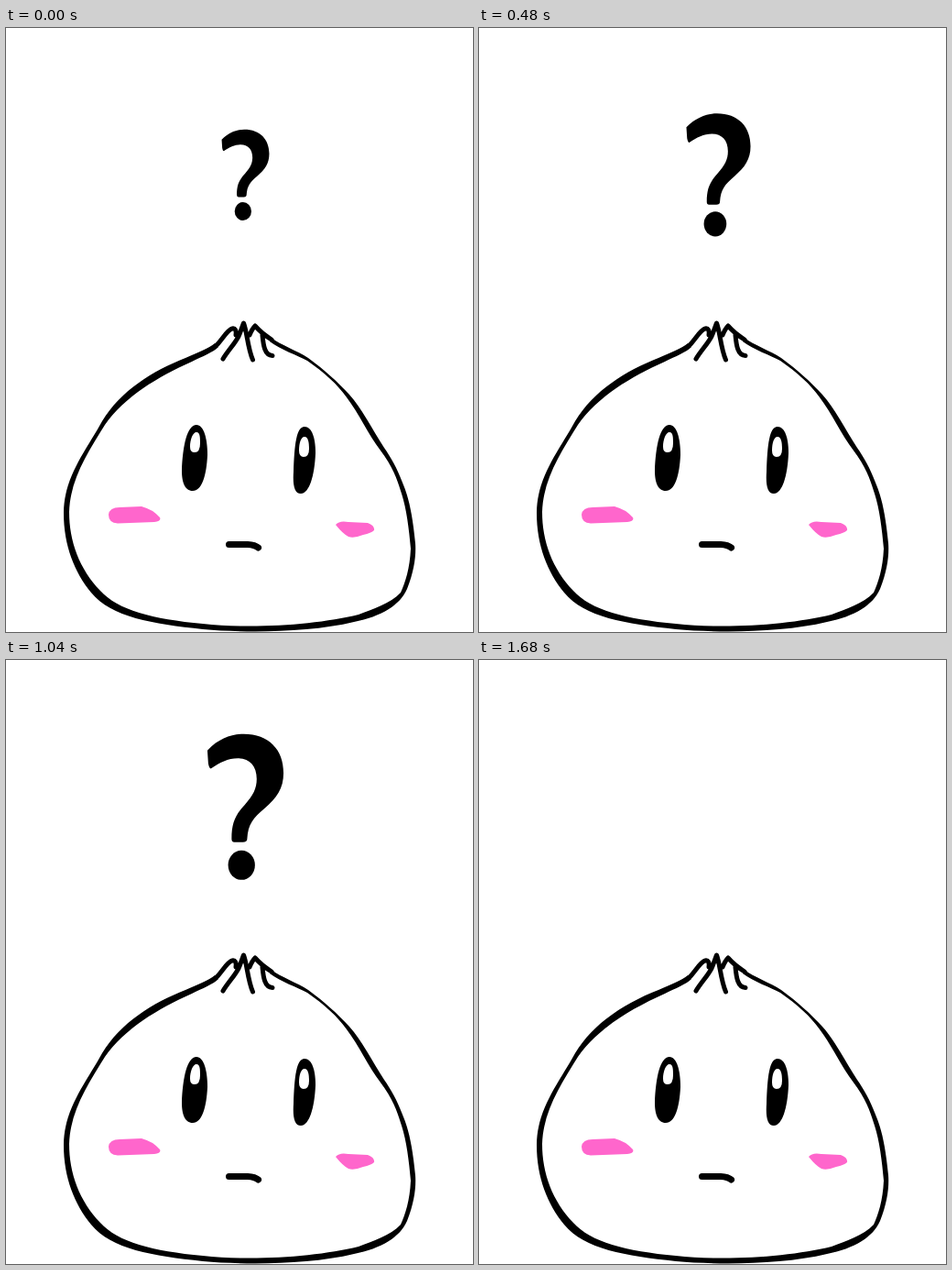
Animation of 510x659 px, one loop 2080 ms. Source, as an HTML page:

```html
<!DOCTYPE html>
<html lang="en">
<head>
<meta charset="utf-8">
<title>Wondering dumpling</title>
<style>
  html, body { margin: 0; width: 100%; height: 100%; overflow: hidden; background: #fff; }
  svg { display: block; width: 510px; height: 659px; }
  .line { fill: none; stroke: #000; stroke-width: 5; stroke-linecap: round; stroke-linejoin: round; }
</style>
</head>
<body>
<svg viewBox="0 0 510 659">
  <!-- body outline, drawn as a band of varying width -->
  <path d="M228 344C222 349 208 355 196 360C160 374 125 396 105 429C88 460 63 490 63 529C63 565 75 594 93 616C115 643 160 650 215 656C260 660 330 660 380 648C410 642 430 630 438 612C446 592 448 575 447 562C444 532 440 512 433 496C427 480 420 468 413 458C400 438 388 414 375 400C362 386 348 373 330 360C318 352 300 346 290 338L288 342C300 351 318 357 329 363C348 376 362 389 372 403C385 420 396 444 409 461C422 478 427 492 431 505C437 522 440 545 442 568C441 590 436 605 431 616C420 628 400 634 385 640C340 651 270 656 215 650C160 645 122 635 103 614C80 590 69 560 69 528C70 492 90 462 108 433C130 402 165 381 203 364C215 358 226 354 232 348Z"/>
  <!-- folds -->
  <path class="line" d="M230 346C236 340 242 329 247 328Q252 327 251 335M237 361C243 351 253 341 255 334L259.500 322C263 330 264 350 269.500 362M266 335Q269 328 272 325Q279 333 290 340M280 335C281 345 282 357 291 357.500"/>
  <!-- cheeks -->
  <path fill="#ff66cc" d="M112 531Q113 523 124 523L148 522Q160 525 168 534Q170 538 162 539L122 540.500Q112 540 112 531ZM360 542Q364 537 374 539L395 540Q403 543 402 548Q399 551 390 553Q380 557 374 555Q368 552 360 542Z"/>
  <path class="line" style="stroke-width:7" d="M243.500 563.500L264 563.500Q272 564 275.500 567"/>
  <g id="open">
    <path d="M208 433C216 433 220 448 220 466C219 488 214 505 204 505C195 505 192 495 192 483C193 455 198 433 208 433ZM326 435C334 435 338 447 338 464C337 489 331 508 322 508C315 508 313 499 314 484C315 455 317 435 326 435Z"/>
    <path fill="#fff" d="M208 441C212 441 212 447 212 453Q212 463 206 463Q201 463 201 457C201 449 204 441 208 441ZM326 446C330 446 331 452 331 459Q331 468 325 468Q320 468 320 461C320 453 322 446 326 446Z"/>
  </g>
  <path id="closed" class="line" style="stroke-width:6" d="M183.500 493.500C192 496 197 503 204 503C211 503 215 498 222.500 498M305.500 500.500C311 503 314 510 321 510C330 510 332 502 340.500 502"/>
  <g id="question">
    <path d="M217 95C230 81 246 76 259 76C288 76 305 94 305 121C305 139 297 150 283 162C270 173 264 180 263 197Q263 201 258 201H248Q245 201 245 197C245 179 249 170 260 158C270 147 274 139 274 128C274 113 266 104 252 104C241 104 231 109 221 116Q219 116 218 110Z"/>
    <ellipse cx="256.500" cy="227.500" rx="15.500" ry="17"/>
  </g>
  <path id="burst" class="line" style="fill:#000"/>
</svg>
<script>
const [open, closed, question, burst] =
  ['open', 'closed', 'question', 'burst'].map(id => document.getElementById(id));

// Each ray: both tips and the width in the middle.
const rays = [
  [184, 30, 218, 53, 8], [245, 15, 247, 52, 11], [314, 9, 302, 62, 8],
  [350, 45, 331, 70, 10], [386, 84, 349, 102, 8], [342, 138, 377, 137, 6],
  [337, 180, 367, 182, 10], [321, 228, 354, 249, 11], [275, 258, 285, 286, 11],
  [234, 250, 217, 285, 9], [200, 205, 168, 246, 9], [187, 151, 148, 172, 8],
  [181, 121, 141, 125, 10], [162, 68, 190, 86, 11]
];

function lens([x1, y1, x2, y2, w]) {
  const len = Math.hypot(x2 - x1, y2 - y1);
  const ux = (x2 - x1) / len, uy = (y2 - y1) / len, b = w - 5;
  const mx = (x1 + x2) / 2, my = (y1 + y2) / 2;
  const a = [x1 + ux * 2.5, y1 + uy * 2.5], c = [x2 - ux * 2.5, y2 - uy * 2.5];
  return `M${a}Q${[mx - uy * b, my + ux * b]} ${c}Q${[mx + uy * b, my - ux * b]} ${a}Z`;
}
burst.setAttribute('d', rays.map(lens).join(''));

const show = (el, on) => el.setAttribute('visibility', on ? 'visible' : 'hidden');

function draw(now) {
  const t = now % 2080;
  const blink = t >= 1440 && t < 1680;
  show(question, t < 1440);
  show(burst, blink);
  show(closed, blink);
  show(open, !blink);
  // The mark grows quickly at first, in steps of 80 ms.
  const step = Math.min(16, Math.floor(t / 80));
  const size = 0.59 + 0.41 * (step / 16) ** 0.7;
  question.setAttribute('transform', `translate(261.5 160.5) scale(${size}) translate(-261 -160.5)`);
}

const start = performance.now();
function loop() {
  draw(performance.now() - start);
  requestAnimationFrame(loop);
}
loop();
</script>
</body>
</html>
```
